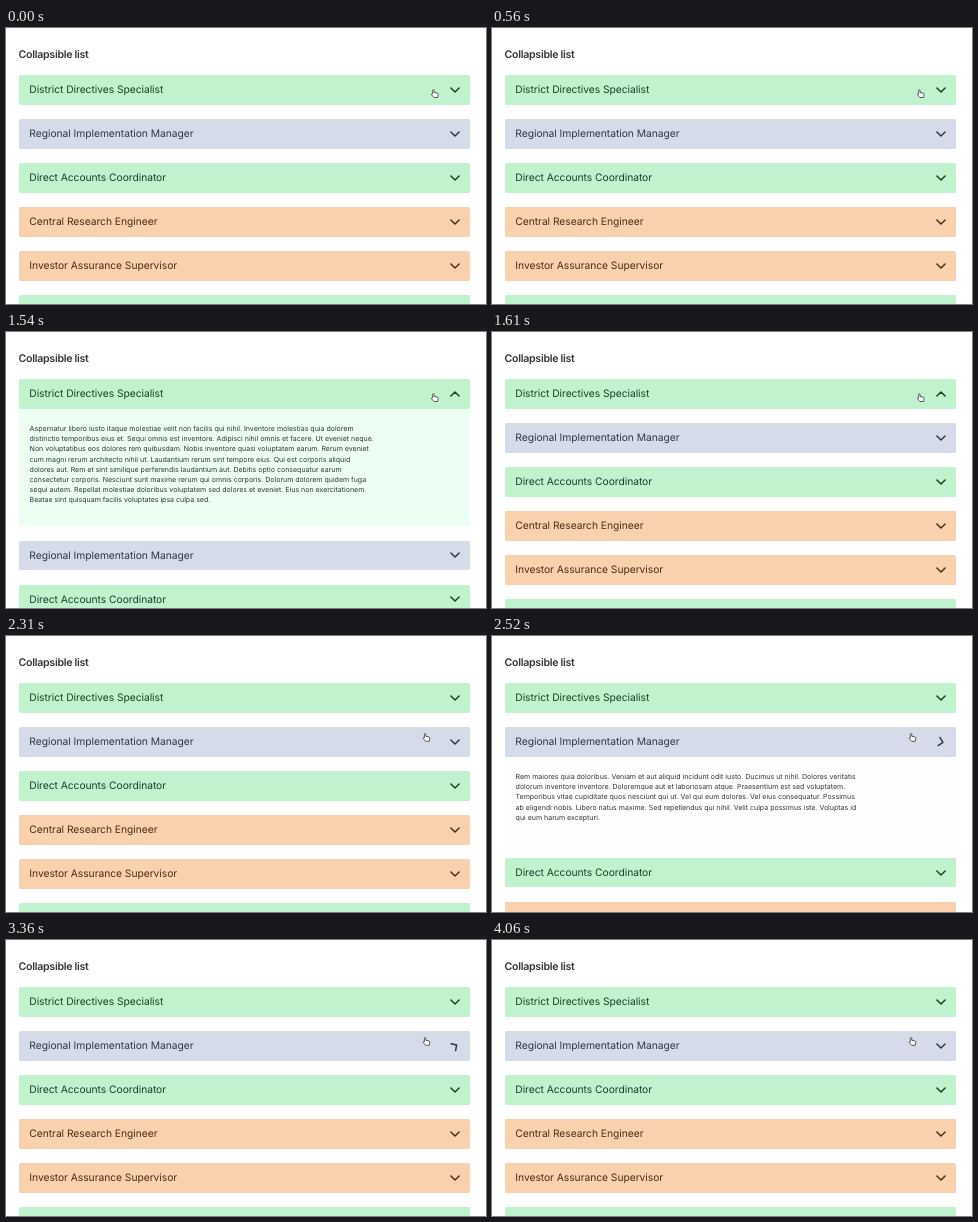
Recreate the animation shown at these times as an HTML page. Size 480x276 px, loop 4130 ms.

```html
<!DOCTYPE html>
<html lang="en">
<head>
<meta charset="utf-8">
<title>Collapsible list</title>
<style>
  html, body { margin: 0; width: 100%; height: 100%; overflow: hidden; background: #fff; }
  #stage { position: relative; width: 480px; height: 276px; overflow: hidden;
           font-family: Inter, Roboto, sans-serif; text-rendering: geometricPrecision; }
  h1 { position: absolute; left: 12.6px; top: 19px; margin: 0; font-size: 10.6px; line-height: 15px;
       font-weight: 600; letter-spacing: -.027em; color: #333; white-space: nowrap; }
  #list { position: absolute; left: 13px; top: 47.3px; width: 451px; }
  .item { margin-bottom: 14.6px; }
  .bar { position: relative; height: 29.4px; border-radius: 1.5px; background: var(--bar); color: var(--ink);
         font-size: 10.3px; line-height: 31px; letter-spacing: -.005em; text-indent: 10.3px; white-space: nowrap; }
  .bar svg { position: absolute; left: 429.8px; top: 8.7px; width: 12px; height: 12px; }
  .bar path { fill: none; stroke: var(--ink); stroke-width: 1.5; stroke-linecap: round; stroke-linejoin: round; }
  .panel { display: none; padding: 15.4px 10.6px 20.6px; background: var(--panel); color: #2d3632;
           font-size: 7.02px; line-height: 10.15px; white-space: pre; }
  .green { --bar: #c0f2cd; --panel: #ecfff2; --ink: #193f2a; }
  .slate { --bar: #d5dbe8; --panel: #fefefe; --ink: #2f3646; }
  .orange { --bar: #f9d1ad; --panel: #fffaf5; --ink: #4c2b17; }
  #cursor { position: absolute; left: 0; top: 0; width: 8px; height: 9px; overflow: visible; }
</style>
</head>
<body>
<div id="stage">
  <h1>Collapsible list</h1>
  <div id="list"></div>
  <svg id="cursor" viewBox="0 0 8 9">
    <path d="M1.9 4.8V1.2a.7.7 0 0 1 1.4 0V3.3l3 .6q1.1.3 1 1.4L6.8 8.3H3.2L.7 5.5q-.2-.9.6-.9z"
          fill="#fff" stroke="#333" stroke-width=".8" stroke-linejoin="round"/>
  </svg>
</div>
<script>
const LOOP = 4130, STEP = 70, TURN = 200;

const items = [
  { title: 'District Directives Specialist', tone: 'green', opens: 592, closes: 1605, text:
`Aspernatur libero iusto itaque molestiae velit non facilis qui nihil. Inventore molestias quia dolorem
distinctio temporibus eius et. Sequi omnis est inventore. Adipisci nihil omnis et facere. Ut eveniet neque.
Non voluptatibus eos dolores rem quibusdam. Nobis inventore quasi voluptatem earum. Rerum eveniet
cum magni rerum architecto nihil ut. Laudantium rerum sint tempore eius. Qui est corporis aliquid
dolores aut. Rem et sint similique perferendis laudantium aut. Debitis optio consequatur earum
consectetur corporis. Nesciunt sunt maxime rerum qui omnis corporis. Dolorum dolorem quidem fuga
sequi autem. Repellat molestiae doloribus voluptatem sed dolores et eveniet. Eius non exercitationem.
Beatae sint quisquam facilis voluptates ipsa culpa sed.` },
  { title: 'Regional Implementation Manager', tone: 'slate', opens: 2430, closes: 3285, text:
`Rem maiores quia doloribus. Veniam et aut aliquid incidunt odit iusto. Ducimus ut nihil. Dolores veritatis
dolorum inventore inventore. Doloremque aut et laboriosam atque. Praesentium est sed voluptatem.
Temporibus vitae cupiditate quos nesciunt qui ut. Vel qui eum dolores. Vel eius consequatur. Possimus
ab eligendi nobis. Libero natus maxime. Sed repellendus qui nihil. Velit culpa possimus iste. Voluptas id
qui eum harum excepturi.` },
  { title: 'Direct Accounts Coordinator', tone: 'green' },
  { title: 'Central Research Engineer', tone: 'orange' },
  { title: 'Investor Assurance Supervisor', tone: 'orange' },
  { title: '', tone: 'green' }
];

const list = document.getElementById('list');
const cursor = document.getElementById('cursor');

for (const item of items) {
  const el = document.createElement('div');
  el.className = 'item ' + item.tone;
  el.innerHTML = `<div class="bar">${item.title}<svg viewBox="-6 -6 12 12"><path d="M-4.1-2 0 2 4.1-2"/></svg></div>
    <div class="panel">${item.text || ''}</div>`;
  list.append(el);
  item.chevron = el.querySelector('path');
  item.panel = el.querySelector('.panel');
}

// Smooth progress from 0 to 1 between two times
function ease(t, start, end) {
  const p = Math.min(1, Math.max(0, (t - start) / (end - start)));
  return p * p * (3 - 2 * p);
}

function render(t) {
  for (const { opens, closes, chevron, panel } of items) {
    if (!opens) continue;
    panel.style.display = t >= opens && t < closes ? 'block' : 'none';
    const turn = ease(t, opens, opens + TURN) - ease(t, closes, closes + TURN);
    chevron.setAttribute('transform', `rotate(${-180 * turn})`);
  }
  const move = ease(t, 1850, 2300);
  cursor.style.transform = `translate(${424.8 - 8.3 * move}px, ${61.2 + 35.8 * move}px)`;
}

const began = performance.now();
function tick() {
  const t = (performance.now() - began) % LOOP;
  render(Math.floor(t / STEP) * STEP);
  requestAnimationFrame(tick);
}
tick();
</script>
</body>
</html>
```
